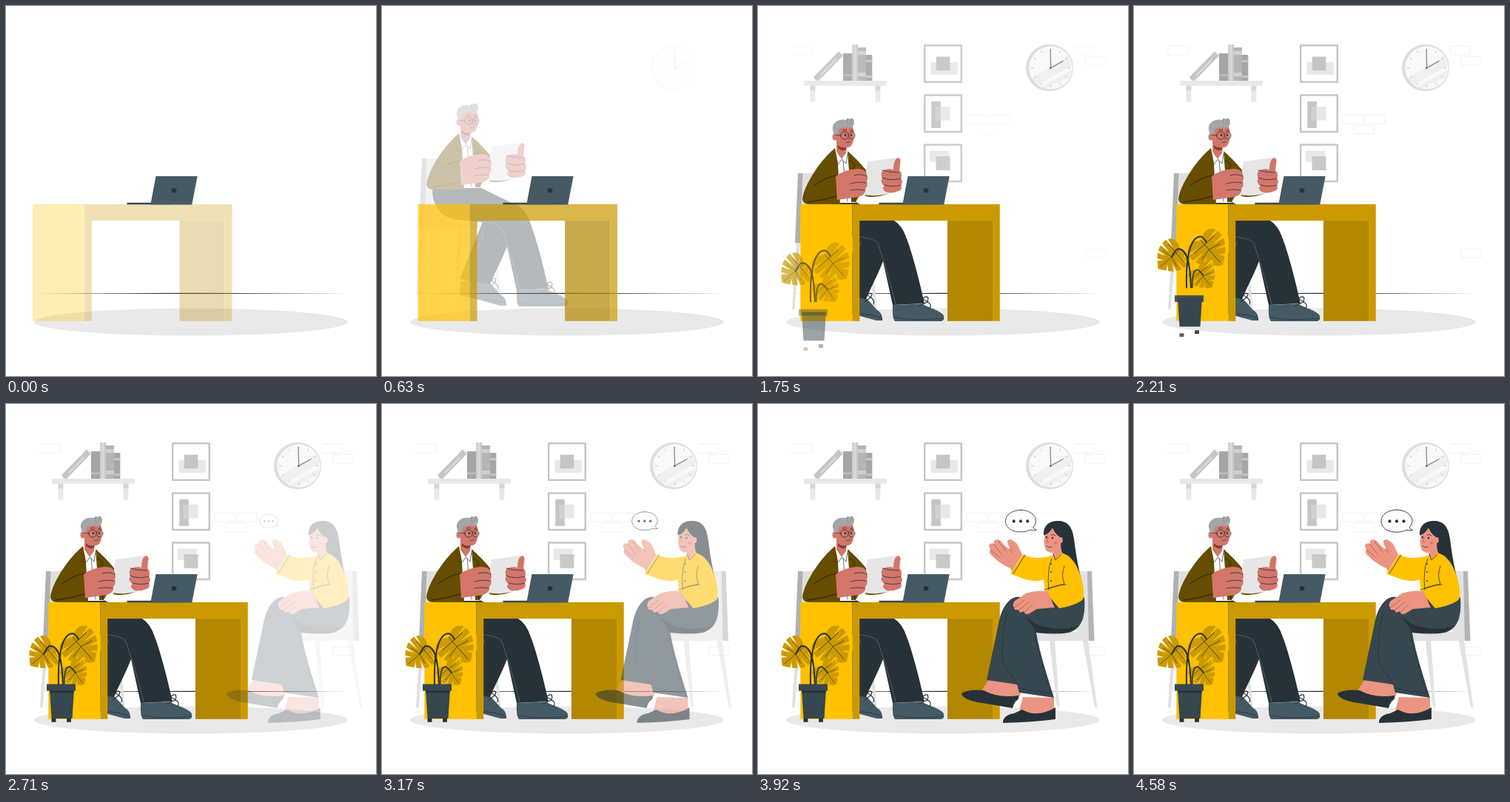
Animation of 500x500 px, one loop 4.62 s. Source, as an HTML page with a canvas:

```html
<!DOCTYPE html>
<html lang="en">
<head>
<meta charset="utf-8">
<title>Office meeting</title>
<style>
html, body { margin: 0; width: 100%; height: 100%; overflow: hidden; background: #fff; }
canvas { display: block; width: 500px; height: 500px; }
</style>
</head>
<body>
<canvas id="stage" width="500" height="500"></canvas>
<script>
const LOOP = 4620;
const screen2d = document.getElementById('stage').getContext('2d');
const buffer = document.createElement('canvas');
buffer.width = buffer.height = 500;
const ink = buffer.getContext('2d');

const DARK = '#263238', SLATE = '#37474f', STEEL = '#455a64';
const GOLD = '#ffc100', OCHRE = '#cb9a00', UMBER = '#b38700', BROWN = '#664d00';
const SKIN = '#d3766a', ROSE = '#eb9481', BLUSH = '#d97565';

const paths = new Map();
function path(d) {
  if (!paths.has(d)) paths.set(d, new Path2D(d));
  return paths.get(d);
}
function fill(color, ...list) {
  ink.fillStyle = color;
  list.forEach(d => ink.fill(path(d)));
}
function line(color, width, ...list) {
  ink.strokeStyle = color;
  ink.lineWidth = width;
  ink.lineCap = ink.lineJoin = 'round';
  list.forEach(d => ink.stroke(path(d)));
}
function box(color, x, y, w, h) {
  ink.fillStyle = color;
  ink.fillRect(x, y, w, h);
}
function oval(x, y, rx, ry, color, edge, width) {
  ink.beginPath();
  ink.ellipse(x, y, rx, ry, 0, 0, Math.PI * 2);
  if (color) { ink.fillStyle = color; ink.fill(); }
  if (edge) { ink.strokeStyle = edge; ink.lineWidth = width; ink.stroke(); }
}

const progress = (t, start, length) => Math.min(1, Math.max(0, (t - start) / length));

// Draws a group on its own so that its parts fade as one.
function layer(alpha, dx, dy, draw, scale = 1, cx = 0, cy = 0) {
  if (alpha <= 0) return;
  ink.setTransform(1, 0, 0, 1, 0, 0);
  ink.clearRect(0, 0, 500, 500);
  ink.translate(cx + dx, cy + dy);
  ink.scale(scale, scale);
  ink.translate(-cx, -cy);
  draw();
  screen2d.globalAlpha = alpha;
  screen2d.drawImage(buffer, 0, 0);
}

function floor() {
  oval(250, 427, 212, 18.5, '#e9e9e9');
  fill(DARK, 'M40 388.4L250 387.7L462 388.4L250 389.1Z');
}

function bricks() {
  ink.strokeStyle = '#efefef';
  ink.lineWidth = 0.9;
  for (const [x, y] of [[46, 54], [427, 54], [442, 68], [282, 147], [312, 147], [297, 161], [442, 328], [31, 328]])
    ink.strokeRect(x + 0.3, y + 0.3, 27, 11.6);
}

function shelf() {
  box('#e8e8e8', 62, 101, 112, 6.7);
  for (const x of [70.5, 158.5]) {
    box('#e8e8e8', x, 107, 6.8, 22.5);
    box('#d6d6d6', x, 107.7, 6.8, 6.5);
  }
  fill('#c5c5c5', 'M75 96L109 61.5L115 67L82 101L78 100.5Z');
  line('#dcdcdc', 2, 'M85 93L105 72.5');
  box('#a6a6a6', 115, 64, 12.5, 37);
  box('#b8b8b8', 115, 92, 12.5, 3);
  box('#c9c9c9', 127.3, 52, 7.7, 49);
  box('#d8d8d8', 129, 52, 4, 49);
  box('#b5b5b5', 135, 56, 11, 45);
  box('#d0d0d0', 135, 61, 11, 5);
  box('#d0d0d0', 135, 90, 11, 5);
  box('#a6a6a6', 146, 66, 8.3, 35);
  box('#c5c5c5', 146, 73, 8.3, 3);
  box('#c5c5c5', 146, 94, 8.3, 3);
}

function frames() {
  for (const y of [53.2, 120.4, 187.6]) {
    ink.fillStyle = '#fff';
    ink.fillRect(225, y, 50, 49.5);
    ink.strokeStyle = '#c7c7c7';
    ink.lineWidth = 2.5;
    ink.strokeRect(225.2, y, 49.6, 49.5);
  }
  box('#e8e8e8', 233.5, 76, 36.5, 17);
  box('#c5c5c5', 240.8, 68.5, 18.6, 18.7);
  box('#c5c5c5', 234.3, 129, 12.5, 36);
  box('#e8e8e8', 240.5, 136, 19, 18.5);
  box('#d0d0d0', 240.5, 136, 6.3, 18.5);
  box('#e8e8e8', 231.7, 195.5, 26.5, 15);
  box('#c9c9c9', 240.5, 203, 19, 19);
}

function clock() {
  oval(394, 83.5, 32, 31.7, '#dedede');
  oval(395.6, 83.5, 29.3, 29, '#f9f9f9');
  fill('#f0f0f0', 'M370 98L420 67L424 80L378 107Z', 'M382 110L424 86L422 95L389 112Z');
  line('#b0b4b6', 0.8, ...Array.from({ length: 12 }, (_, i) => {
    const a = i * Math.PI / 6, c = Math.cos(a), s = Math.sin(a);
    return `M${395.6 + c * 23.5} ${83.5 + s * 23.5}L${395.6 + c * 26} ${83.5 + s * 26}`;
  }));
  line('#777', 1.1, 'M395.8 84L395 58.5', 'M395 84L412 74.5');
  oval(395.3, 83.7, 1.5, 1.5, '#777');
}

function man() {
  fill('#e0e0e0', 'M59 226H100V320H56Z', 'M51 312H154V320H51Z', 'M52 320H57L49.5 410H46Z',
    'M104 320H109L101 410H98Z', 'M147 320H152L160.5 410H157.5Z');
  fill('#b0b0b0', 'M54 226H60.5L57 320H50Z');

  fill(STEEL, 'M106 392L140 389Q152 400 160 410Q169 415 168 425H160L105 410Z');
  fill(DARK, 'M69 262C65 285 77 306 102 309L136 312L105 389L146 396C153 379 162 363 169 345L182 404L225 402C217 366 206 324 197 305Q190 291 177 287L126 262Z');
  line('#647178', 0.7, 'M128 311Q158 313 162 321C168 338 179 374 186 402', 'M112 387Q132 348 139 318');
  fill(STEEL, 'M182 404L222 402.5C230 408 244 410 251 418V424L248 426H185Q181 421 182 404Z');
  line(DARK, 0.8, 'M183 421Q212 426 251 422', 'M137 416Q155 416 168 423');
  line(DARK, 1.2, 'M218 405L229 400Q232 390 224 394Q221 396 228 399Q236 404 232 408',
    'M144 400L152 394Q157 386 149 389Q147 391 153 394Q158 399 156 403');

  fill('#fff', 'M103 194L121 195L132 266H106Z');
  fill(SKIN, 'M106 178L120 188L119 202L113 209L106 199Z');
  fill('#813d35', 'M108 188Q113 193 119 191V194Q113 197 108 192Z');
  fill('#fff', 'M104 194L113 207L120 197L124 207L119 212L114 208L108 214Z');
  line(DARK, 0.7, 'M104 196L108 214L113.5 207L119 213L121 200', 'M115 209L121 264');
  fill(BROWN, 'M104 192Q92 202 81 217C71 231 61 249 60 261Q61 268 69 268H111L108 214Z',
    'M121 196Q135 208 147 223L143 245L132 265L126 265Z', 'M145 254Q160 257 176 248L177 253Q160 260 145 257Z');
  line('#211c0a', 0.9, 'M106 229Q91 231 76 243', 'M67 265Q86 263 106 257', 'M124 208L131 215L128 221L131 263');

  fill(SKIN, 'M105 164Q116 158 128 163C131 171 130 183 126 189Q120 194 112 189Q105 183 105 164Z');
  oval(104, 177, 3.5, 4.6, SKIN);
  fill('#a6a6a6', 'M104 174Q99 167 102 160Q108 152 119 154Q121 150 124 153Q129 149 130 157Q130 164 123 165Q114 162 109 168L108 176Z');
  line('#858585', 0.7, 'M121 153Q119 158 123 160', 'M126 152Q127 156 125 159');
  oval(117, 175, 5.3, 5.2, null, DARK, 0.8);
  oval(126.7, 175, 4.2, 5, null, DARK, 0.8);
  line(DARK, 0.8, 'M112 175L104 174', 'M115 168Q118 166 120 168', 'M125 168Q127 167 129 169', 'M119 184Q122 186 125 183');
  oval(118, 174.5, 1.2, 1.6, DARK);
  oval(126, 174.5, 1.1, 1.6, DARK);
  line('#a34f47', 0.8, 'M122 175Q125 180 122 181');

  fill('#e6e6e6', 'M148 210L187 205L178 253Q162 258 141 255Z');
  fill(SKIN, 'M105 230Q117 221 134 220Q146 220 147 228Q149 233 147 237Q149 243 145 247Q146 255 136 258L107 262Z',
    'M183 221Q183 207 189 205Q194 205 192 214L191 222Q196 227 193 233Q197 237 193 242Q196 247 190 250Q177 255 171 250Q167 246 171 243Q164 238 168 233Q165 226 169 222Q177 219 183 221Z');
  line(DARK, 0.8, 'M130 229Q139 226 147 230', 'M125 240Q137 237 146 239', 'M125 249Q136 247 144 249',
    'M168 232Q180 237 193 233', 'M171 242Q182 245 193 242', 'M168 222Q179 225 190 225');
}

function desk() {
  box(GOLD, 57.3, 267.8, 70.2, 158);
  box(OCHRE, 127.5, 267.8, 199.3, 22.3);
  box(OCHRE, 127.5, 290, 9.8, 135.8);
  box(UMBER, 256, 290.1, 61, 135.7);
  box(OCHRE, 317, 290, 9.8, 135.8);
}

function laptop() {
  fill(SLATE, 'M163.5 265.8H222V268.3H163.5Z');
  fill(STEEL, 'M202.5 230H258.7L251.2 268.5H195.3Z');
  oval(227, 249.2, 3.3, 3.3, DARK);
}

const HEART = 'M0 .04C.18 -.2 .6 -.15 .58 .25C.56 .6 .3 .8 0 1C-.3 .8 -.56 .6 -.58 .25C-.6 -.15 -.18 -.2 0 .04Z';
const NOTCHES = ['M.2 .14L.7 .03V.13Z', 'M.18 .33L.7 .31V.43Z', 'M.16 .5L.6 .61L.55 .72Z', 'M.1 .66L.4 .86L.32 .95Z'];

// A heart-shaped blade with wedges cut out of both sides.
function leaf(x, y, length, angle) {
  ink.save();
  ink.translate(x, y);
  ink.rotate(angle);
  ink.scale(length, length);
  fill(OCHRE, HEART);
  ink.globalCompositeOperation = 'destination-out';
  for (let side = 0; side < 2; side++) {
    fill('#000', ...NOTCHES);
    ink.scale(-1, 1);
  }
  ink.globalCompositeOperation = 'source-over';
  line('#54430f', 0.02, 'M0 0V.88', 'M0 .18L.4 .17M0 .18L-.4 .17', 'M0 .38L.36 .46M0 .38L-.36 .46');
  ink.restore();
}

function leaves() {
  leaf(62, 328, 39, 0.85);
  leaf(90, 315, 45, -0.72);
  leaf(86, 354, 32, -0.65);
  line(DARK, 2, 'M71 379C70 345 74 311 90 310Q94 311 98 318', 'M77 379C76 345 71 326 59 327Q55 329 51 338');
  line(DARK, 1.5, 'M79 379Q78 357 85 355Q89 356 94 363');
}

const potParts = [
  [170, () => {
    fill(SLATE, 'M59 386H92L89.5 425H61.5Z');
    box(DARK, 59.5, 387, 32, 3);
  }],
  [270, () => box(SLATE, 55, 378.5, 39, 9)],
  [390, () => box(DARK, 61.5, 425, 6, 4.8)],
  [290, () => box(DARK, 82, 425, 6, 4.8)]
];

function woman() {
  fill('#e2e2e2', 'M430 226H446L449 320H430Z', 'M373 308H454V320H378Z', 'M394 320H401L407.5 410H404Z', 'M439 320H446L458.5 410H455Z');
  fill('#b5b5b5', 'M445 226H451L454.5 320H447Z');

  fill(DARK, 'M386 176C386 162 396 157.5 406 158C419 158 425 167 427 182C430 206 433 222 437 237Q419 231 407 207Z');

  fill(ROSE, 'M311 373L357 379L354 395L318 395L303 386Z', 'M358 396L400 397V414Q380 424 353 415Z');
  fill(DARK, 'M275 391Q284 385 305 387Q325 398 352 394Q354 398 348 402Q345 406 344 411L303 404Q276 400 275 391Z',
    'M331 430Q332 420 346 418L357 413Q377 425 402 410V426Q373 430 331 431Z');

  fill(SLATE, 'M350 260.5C336 263 328 280 325 297Q317 335 309 373L350 379L353 390L400 397C391 368 381 338 376 309Q403 312 420 309C438 304 443 287 441 261L385 264Z');
  fill(DARK, 'M362 287Q375 300 391 302Q413 307 432 299Q426 309 409 310L376 309Z');
  line(DARK, 0.7, 'M336 284Q327 330 331 351L351 380', 'M352 383Q375 390 398 391', 'M372 306Q383 350 396 394');

  fill(ROSE, 'M400 192L411 188L412 203L404 213L398 205Z');
  fill(GOLD, 'M397 205L411 201C421 204 430 214 435 230C440 244 442 259 439 264Q430 272 407 276L388 254L386 237Q373 244 341 229L358 203Q374 212 397 205Z');
  fill(ROSE, 'M399 202L409 200L402 211Z');
  line(DARK, 0.8, 'M399 203L402 211L410 203', 'M397 209Q390 225 393 251', 'M414 219Q409 232 414 243L387 251', 'M393 249Q404 244 416 244', 'M361 204L345 229', 'M402 275L390 254');
  for (const y of [216, 227, 239]) oval(396, y, 0.9, 0.9, DARK);

  fill(ROSE, 'M387.5 170Q400 164 409 174L409 191Q404 201 395 201Q387 199 386.5 187Z');
  fill(DARK, 'M386 177Q387 160 403 160Q421 163 419 192L422 206L411 201Q408 193 410 181Q402 177 398 167Q394 175 386 177Z');
  oval(409, 184, 2.8, 4, ROSE);
  oval(390, 180, 1.1, 1.5, DARK);
  oval(398, 181, 1.1, 1.5, DARK);
  oval(402, 188, 2.6, 1.8, BLUSH);
  line(DARK, 0.8, 'M388 176L391 175', 'M396 177Q399 175 402 178', 'M390 192Q393 195 397 193');
  line('#b9574b', 0.8, 'M393 180Q388 187 392 187');

  fill(ROSE, 'M341 222Q332 218 325 213L315 204Q311 200 314 197L312 191Q314 187 319 189Q318 183 323 183Q328 183 332 190Q336 194 341 197L338 190Q335 183 341 183Q350 186 353 195L357 204L343 226Z',
    'M391 253Q376 251 362 256L347 266Q343 270 346 275Q346 279 352 278Q353 284 359 280Q361 286 367 283L377 277L401 275Z');
  line('#a75449', 0.8, 'M314 197L326 207', 'M318 189L330 204', 'M325 186L336 200', 'M340 196L344 201',
    'M347 275L360 265', 'M353 278L366 268', 'M360 281L371 271');
}

const BALLOON = 'M355 143C366.6 143 376 149.7 376 158.3Q376 163 372 167Q374 170 376.5 170.5Q372 172 368 170.2C362 174 348 174.5 341 169.8C336 166.5 334 162.5 334 158.3C334 149.7 343.4 143 355 143Z';

function bubble() {
  fill('#fff', BALLOON);
  line(DARK, 0.9, BALLOON);
  for (const x of [345.5, 355, 364.5]) oval(x, 158.4, 2.1, 2.1, DARK);
}

function plantPart(t, start, draw) {
  const p = progress(t, start, 1100);
  layer(Math.min(1, p * 1.25), 0, 45 * (1 - p), draw);
}

function render(t) {
  screen2d.globalAlpha = 1;
  screen2d.fillStyle = '#fff';
  screen2d.fillRect(0, 0, 500, 500);

  layer(1, 0, 0, floor);
  layer(progress(t, 1250, 900), 0, 0, bricks);
  const decor = progress(t, 800, 1050);
  layer(decor, 0, 0, shelf);
  layer(decor, 0, 0, frames);
  layer(progress(t, 540, 950), 0, 0, clock);

  const manIn = progress(t, 240, 1160);
  layer(manIn, 0, -30 * (1 - manIn), man);
  const deskIn = progress(t, -430, 1500);
  layer(deskIn, -30 * (1 - deskIn), 0, desk);
  layer(1, 0, 0, laptop);

  plantPart(t, 1145, leaves);
  potParts.forEach(([delay, draw]) => plantPart(t, 1145 + delay, draw));

  const womanIn = progress(t, 2350, 1500);
  layer(womanIn, 30 * (1 - womanIn), 0, woman);
  const pop = 1 - (1 - progress(t, 2400, 2200)) ** 3;
  layer(pop ** 1.4, 0, 0, bubble, 0.35 + 0.65 * pop, 355, 158);
}

const begin = performance.now();
function tick() {
  render((performance.now() - begin) % LOOP);
  requestAnimationFrame(tick);
}
tick();
</script>
</body>
</html>
```
